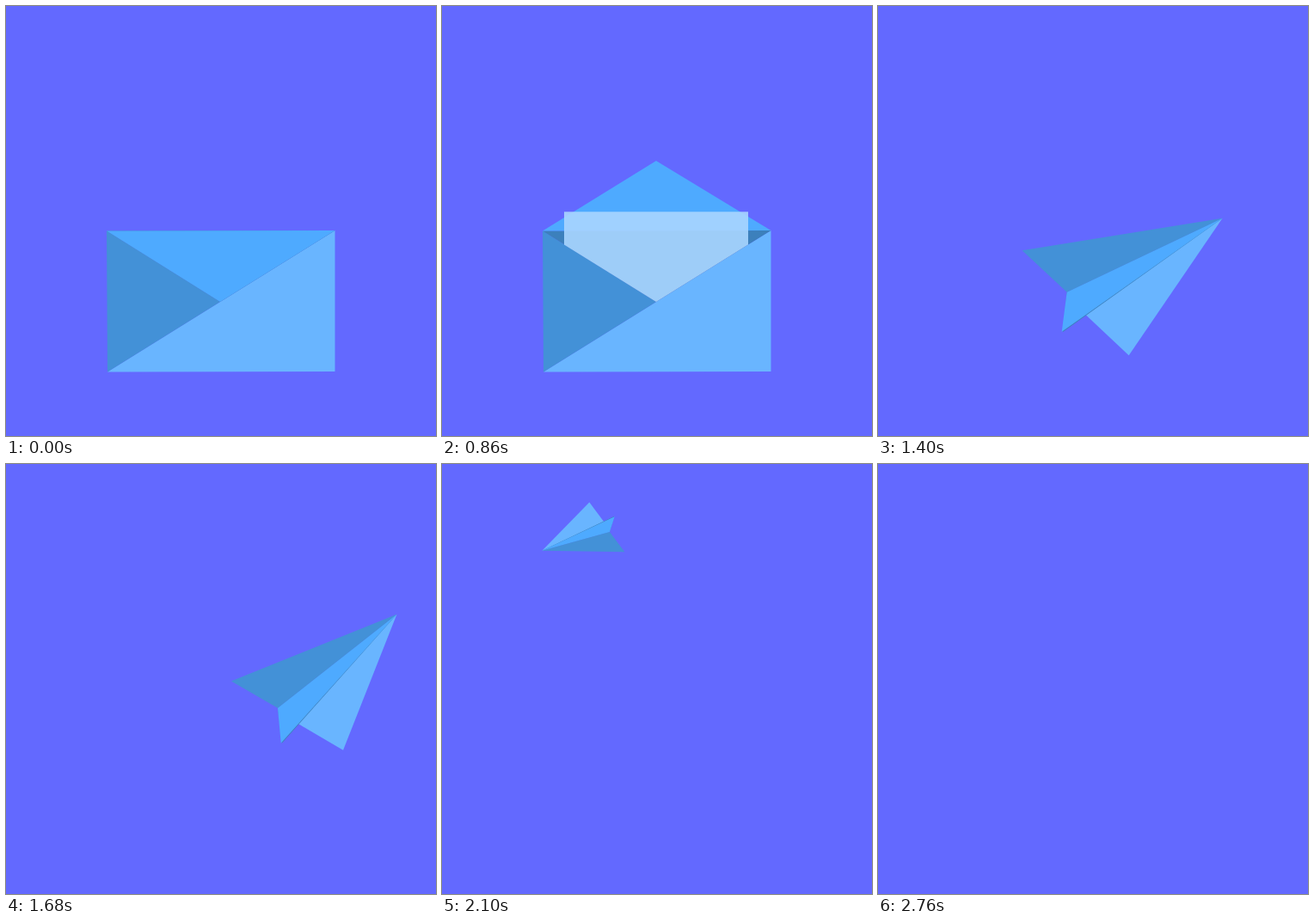
Write an HTML page that moves like this. It is 500 px wide and 500 px high and loops after 2900 ms.

```html
<!DOCTYPE html>
<html lang="en">
<head>
<meta charset="utf-8">
<title>Envelope to paper plane</title>
<style>
  html, body { margin: 0; width: 100%; height: 100%; overflow: hidden; background: #6369ff; }
  svg { display: block; width: 100vw; height: 100vh; }
</style>
</head>
<body>
<svg viewBox="0 0 500 500">
  <clipPath id="mouth"><path d="M0 0H500L382.5 261L249 344L117 262Z"/></clipPath>
  <polygon id="light" fill="#69b5ff"/>
  <polygon id="dark" fill="#4391d7"/>
  <polygon id="back" fill="#3c80bc"/>
  <polygon id="flap" fill="#4eaaff"/>
  <g clip-path="url(#mouth)">
    <rect id="letter" x="142" width="214" height="140" fill="#abd6ff"/>
  </g>
</svg>
<script>
const LOOP = 2900, RISE = 645, MORPH = 880, FLY = 1180, END = 2760;
const el = id => document.getElementById(id);
const parts = { light: el('light'), dark: el('dark'), back: el('back'), flap: el('flap') };
const letter = el('letter');

const RAD = Math.PI / 180;
const sin = deg => Math.sin(deg * RAD), cos = deg => Math.cos(deg * RAD);
const mix = (a, b, p) => a + (b - a) * p;
const span = (t, a, b) => Math.min(1, Math.max(0, (t - a) / (b - a)));
const smooth = p => p * p * (3 - 2 * p);
// S-curve: power sets the steepness, a larger lag moves the middle later
const swing = (u, power, lag) => u ** power / (u ** power + lag * (1 - u) ** power);

// Envelope corners
const A = [117, 261.5], B = [249, 344], C = [118, 425.5], D = [382.5, 261], E = [382.5, 425];
// Plane corners relative to its nose
const nose = [0, 0], wing = [-233, 37.6], fold = [-181, 86], keel = [-187, 132];
const tail = [-109, 159.5], root = [-181, 91.8], crease = [-186, 132.6];

const plane = {
  light: [nose, tail, root],
  dark: [nose, wing, fold],
  back: [nose, fold, crease],
  flap: [nose, fold, keel]
};
const envelope = tipY => ({
  light: [D, E, C],
  dark: [B, A, C],
  back: [D, A, B],
  flap: [D, A, [249, tipY]]
});

// The nose circles a tilted ellipse while the plane turns and shrinks
function flight(t) {
  const u = span(t, FLY, END);
  const angle = -48.1 + 330 * swing(u, 2.11, 1.83);
  const turn = angle + 44.3;
  return {
    x: 243.3 + 219.5 * cos(angle),
    y: 185.5 - 149 * sin(angle + 20),
    scale: 1.018 * (1 - swing(u, 2.05, 1.32)),
    rot: 31 * sin(1.065 * turn) - turn
  };
}

function place([px, py], { x, y, scale, rot }) {
  const c = scale * cos(rot), s = scale * sin(rot);
  return [x + px * c - py * s, y + px * s + py * c];
}

function draw(t) {
  const open = 1 - (1 - span(t, 65, 610)) ** 2.5;
  const paper = envelope(mix(344, 180, open));
  const morph = smooth(span(t, MORPH, FLY));
  const pose = flight(t);
  for (const id in parts) {
    const points = paper[id].map((from, i) => {
      const to = place(plane[id][i], pose);
      return from.map((v, k) => mix(v, to[k], morph).toFixed(2));
    });
    parts[id].setAttribute('points', points.join(' '));
  }

  const rise = span(t, RISE, 1070) ** 1.65;
  letter.setAttribute('y', mix(346, 20, rise).toFixed(2));
  letter.setAttribute('opacity', t < RISE ? 0 : 1 - rise * rise);
}

const start = performance.now();
function tick() {
  draw((performance.now() - start) % LOOP);
  requestAnimationFrame(tick);
}
draw(0);
requestAnimationFrame(tick);
</script>
</body>
</html>
```
